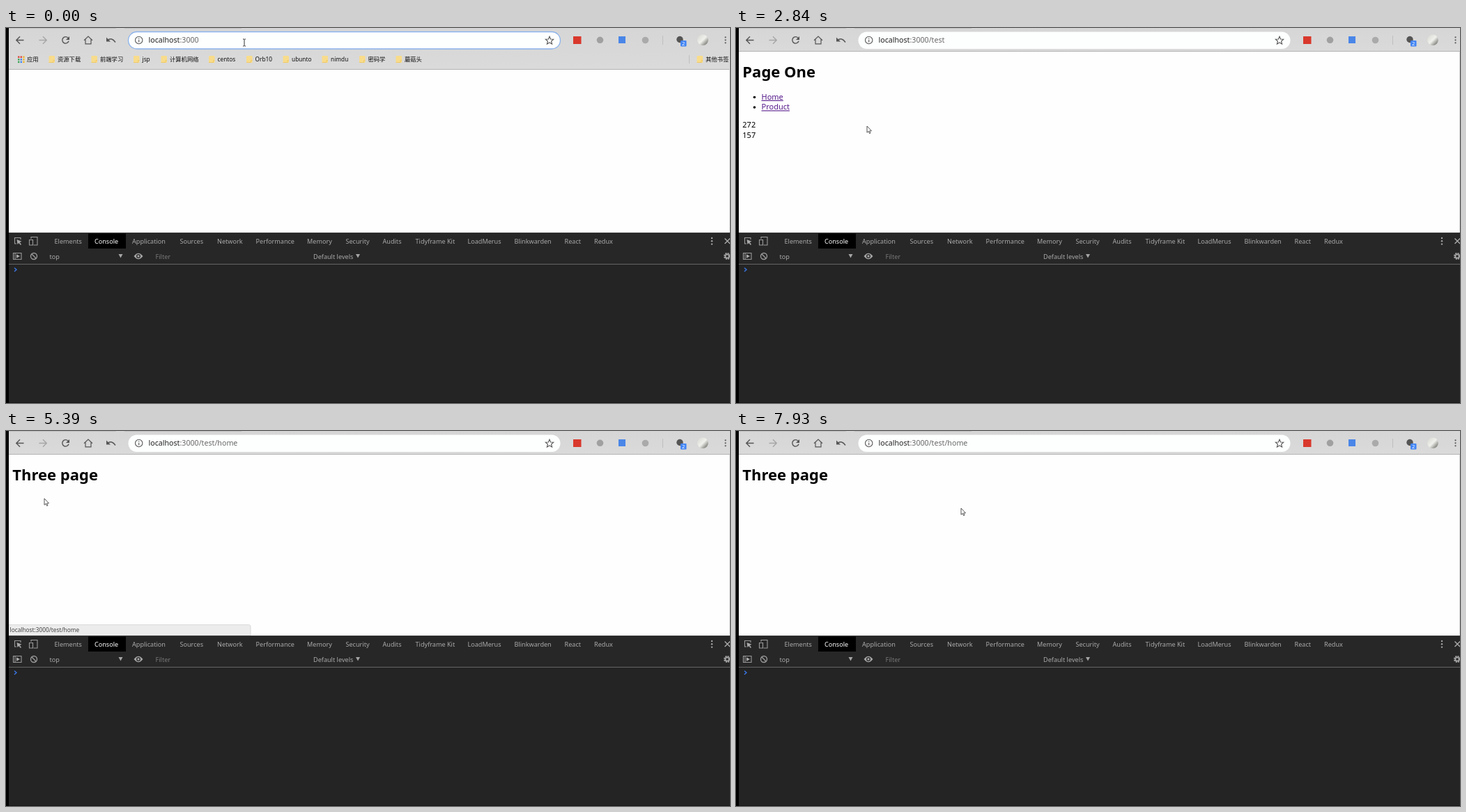
An HTML page that plays this animation: 1039x539 px, repeating every 8 s.

```html
<!DOCTYPE html>
<html lang="zh-CN">
<head>
<meta charset="utf-8">
<title>Page One</title>
<style>
html, body { margin: 0; width: 100%; height: 100%; overflow: hidden; background: #fff; }
svg { display: block; width: 100%; height: 100%; }
text { font-family: "Noto Sans", "Noto Sans CJK SC", "Noto Sans CJK", sans-serif; }
.mark { font-size: 8.3px; font-weight: 500; fill: #111; }
.tool { font-size: 9.1px; fill: #a9a9a9; }
.page { font-size: 11px; fill: #000; }
.page .title { font-size: 22px; font-weight: 700; }
.link { fill: #551a8b; text-decoration: underline; }
.line { fill: none; stroke: #555; stroke-width: 1.4; }
.dim { fill: none; stroke: #9a9a9a; stroke-width: 1.1; }
</style>
</head>
<body>
<svg viewBox="0 0 1039 539">
  <defs>
    <linearGradient id="bar" x1="0" y1="0" x2="0" y2="1">
      <stop offset="0" stop-color="#d6d6d6"/><stop offset="1" stop-color="#dadada"/>
    </linearGradient>
    <linearGradient id="photo" x1="0" y1="0" x2="1" y2="1">
      <stop offset="0" stop-color="#d8d8d2"/><stop offset=".5" stop-color="#f0f0ec"/><stop offset="1" stop-color="#55554f"/>
    </linearGradient>
  </defs>
  <rect width="1039" height="539" fill="#fefefe"/>

  <g id="one" class="page">
    <text class="title" x="9.3" y="71.3">Page One</text>
    <circle cx="26.5" cy="99.5" r="1.8"/><circle cx="26.5" cy="114" r="1.8"/>
    <text class="link" x="36.5" y="102.8">Home</text>
    <text class="link" x="36.5" y="117.4">Product</text>
    <text id="numX" x="9.3" y="143"/>
    <text id="numY" x="9.3" y="157.7"/>
  </g>
  <g id="three" class="page"><text class="title" x="9.3" y="71.3">Three page</text></g>

  <g id="status">
    <path d="M4 278.5H348.500Q351 278.500 351 281V294H4Z" fill="#ececec" stroke="#d4d4d4" stroke-width=".8"/>
    <text id="statusText" x="5.500" y="289" font-size="8.300" fill="#444"/>
  </g>

  <rect id="barBack" width="1039" height="60" fill="url(#bar)"/>
  <path d="M4 .5H158M170 .5H338" stroke="#c2c2c2"/>
  <path id="barEdge" d="M4 0H1039" stroke="#b3b3b3"/>
  <g id="marks">
    <path d="M980.5 39V51" stroke="#bfbfbf"/>
  </g>

  <path class="line" d="M25.500 17.500H15M20 12.300L14.800 17.500L20 22.700"/>
  <path class="line" style="stroke:#a6a6a6" d="M47.500 17.500H58M53 12.300L58.200 17.500L53 22.700"/>
  <g id="reload"><path class="line" d="M89 14.200A4.700 4.700 0 1 0 90 18.800"/><path d="M91 12V17H86Z" fill="#555"/></g>
  <path id="stop" class="line" d="M81 13L90 22M90 13L81 22"/>
  <path class="line" style="stroke-width:1.200" d="M112 17.800L118 12L124 17.800M114 16.500V22.800H122V16.500"/>
  <path class="line" d="M145.500 17.500Q152 13 157 20.500"/><path d="M144 13.500V19.500H150Z" fill="#555"/>

  <rect id="field" x="175.500" y="5.500" width="620" height="24.500" rx="12.250" stroke-width="1.300"/>
  <g id="info" fill="none" stroke="#555" stroke-width="1.100">
    <circle cx="190.700" cy="17.500" r="5.200"/><path d="M190.700 16.700V20.500M190.700 14.300V15.500"/>
  </g>
  <g id="globe" fill="none" stroke="#666" stroke-width="1">
    <circle cx="190.700" cy="17.500" r="5.200"/><ellipse cx="190.700" cy="17.500" rx="2.300" ry="5.200"/><path d="M185.500 17.500H196"/>
  </g>
  <text x="204.500" y="21.300" font-size="10.650"><tspan fill="#222">localhost</tspan><tspan id="path"/></text>
  <path id="star" d="M780 12.200L781.600 16L785.700 16.300L782.600 19L783.600 23L780 20.800L776.400 23L777.400 19L774.300 16.300L778.400 16Z" fill="none" stroke="#555" stroke-width="1.100"/>

  <rect x="814" y="12" width="11.500" height="11" fill="#d9382c"/>
  <circle cx="852.500" cy="17.300" r="4.800" fill="#a0a0a0"/>
  <rect x="879" y="12" width="10" height="10" fill="#4a86e8"/>
  <circle cx="917.500" cy="17.500" r="4.800" fill="#aaa"/>
  <path d="M942.500 11V24" stroke="#bebebe"/>
  <circle cx="967" cy="16.500" r="4.700" fill="#555"/>
  <rect x="968" y="18" width="8.500" height="8.500" rx="1" fill="#4285f4"/>
  <text x="972.200" y="25" font-size="7.500" fill="#fff" text-anchor="middle">2</text>
  <circle cx="1000" cy="17.300" r="7.800" fill="url(#photo)"/>
  <g fill="#555"><circle cx="1032.500" cy="13.300" r="1.100"/><circle cx="1032.500" cy="17.300" r="1.100"/><circle cx="1032.500" cy="21.300" r="1.100"/></g>

  <g id="tools">
    <rect y="294" width="1039" height="245" fill="#242424"/>
    <rect y="294" width="1039" height="45" fill="#272727"/>
    <path d="M4 294.500H1039" stroke="#3a3a3a"/>
    <path d="M4 339.500H1039" stroke="#656565"/>
    <path d="M4 538.500H1039" stroke="#151515"/>
    <rect x="118" y="295.500" width="54" height="21.500" fill="#000"/>
    <path class="dim" d="M15 310H12.500V301.500H21V304"/><path d="M15.500 304L22.500 306.800L19.700 308L22 311L20.800 312L18.500 309L16.500 311Z" fill="#aaa"/>
    <path class="dim" d="M36 303V300.500H45V312H39.500M33.500 304.500H38.500V312H33.500Z"/>
    <path class="dim" d="M10.500 323.500H22V332.500H10.500ZM13 323.500V332.500"/><path d="M15 325.300L20 328L15 330.700Z" fill="#aaa"/>
    <g class="dim" style="stroke-width:1.400"><circle cx="40" cy="328" r="4.500"/><path d="M36.800 324.800L43.200 331.200"/></g>
    <path d="M161.500 325H167.500L164.500 330.500ZM502 325H508L505 330.500Z" fill="#a5a5a5"/>
    <path d="M183.500 328Q190 319.500 196.500 328Q190 336.500 183.500 328Z" fill="#a5a5a5"/>
    <circle cx="190" cy="328" r="2.300" fill="none" stroke="#272727" stroke-width="1.300"/>
    <g fill="#a5a5a5"><circle cx="1013" cy="302" r="1.200"/><circle cx="1013" cy="306.300" r="1.200"/><circle cx="1013" cy="310.600" r="1.200"/></g>
    <path d="M1031.500 302.500L1039 310M1039 302.500L1031.500 310" stroke="#aaa" stroke-width="1.400"/>
    <circle cx="1035" cy="328" r="4.200" fill="none" stroke="#a5a5a5" stroke-width="1.800" stroke-dasharray="2.100 1.200"/>
    <circle cx="1035" cy="328" r="2.700" fill="none" stroke="#a5a5a5" stroke-width="1.800"/>
    <path d="M12 344.700L15 347.300L12 350" fill="none" stroke="#3b78e7" stroke-width="1.400"/>
  </g>

  <path d="M1038.500 34V294" stroke="#d5d5d5"/>
  <rect width="4" height="539" fill="#000"/>

  <g id="arrow"><path d="M0 0V9.300L2.100 7.400L3.600 10.600L5 10L3.600 6.900H6.500Z" fill="#fff" stroke="#444" stroke-width=".9"/></g>
  <g id="hand"><path d="M-1 0Q0 -1 1 0V4L4.500 5Q5.500 5.500 5.200 7L4 12H-1.500L-4 7.500Q-3.500 6 -1 8Z" fill="#fff" stroke="#444" stroke-width=".9"/></g>
  <g id="beam"><path d="M-2 -5H-.6L0 -4.400L.6 -5H2M0 -4.400V4.400M-2 5H-.6L0 4.400L.6 5H2" fill="none" stroke="#333" stroke-width="1"/></g>
</svg>
<script>
const LOOP = 8000;
const $ = id => document.getElementById(id);
const show = (id, on) => $(id).setAttribute('display', on ? 'inline' : 'none');
const set = (id, attrs) => Object.entries(attrs).forEach(([k, v]) => $(id).setAttribute(k, v));

function add(parent, tag, attrs, text = '') {
  const el = document.createElementNS('http://www.w3.org/2000/svg', tag);
  Object.entries(attrs).forEach(([k, v]) => el.setAttribute(k, v));
  el.textContent = text;
  $(parent).appendChild(el);
}

function buildBookmarks() {
  const names = [['资源下载', 74], ['前端学习', 135], ['jsp', 195.5], ['计算机网络', 235], ['centos', 303.5],
    ['Orb10', 357.5], ['ubunto', 410], ['nimdu', 466], ['密码学', 519.5], ['蘑菇头', 572], ['其他书签', 1004]];
  const dots = ['#e0453a', '#e0453a', '#f0b429', '#3aa757', '#4285f4', '#f0b429', '#3aa757', '#4285f4', '#f0b429'];
  dots.forEach((fill, i) => add('marks', 'rect',
    { x: 17 + i % 3 * 3.6, y: 40.5 + Math.floor(i / 3) * 3.6, width: 2.4, height: 2.4, fill }));
  add('marks', 'text', { x: 30, y: 48.3, class: 'mark' }, '应用');
  for (const [name, x] of names) {
    add('marks', 'rect', { x: x - 12.5, y: 40, width: 8.5, height: 10, rx: 1, fill: '#f8dc8b' });
    add('marks', 'path', { d: `M${x - 12.5} 49.5h6.500v-3h2`, fill: 'none', stroke: '#edc45f', 'stroke-width': .8 });
    add('marks', 'text', { x, y: 48.3, class: 'mark' }, name);
  }
}

function buildTools() {
  const tabs = [['Elements', 69.5], ['Console', 127], ['Application', 181], ['Sources', 249.5], ['Network', 303],
    ['Performance', 358.5], ['Memory', 432], ['Security', 487.5], ['Audits', 540.5], ['Tidyframe Kit', 587.5],
    ['LoadMerus', 662.5], ['Blinkwarden', 729.5], ['React', 801.5], ['Redux', 844]];
  for (const [name, x] of tabs)
    add('tools', 'text', { x, y: 309.7, class: 'tool', style: name === 'Console' ? 'fill:#fff' : '' }, name);
  add('tools', 'text', { x: 62.5, y: 331.5, class: 'tool' }, 'top');
  add('tools', 'text', { x: 214.5, y: 332, class: 'tool', style: 'fill:#777' }, 'Filter');
  add('tools', 'text', { x: 441, y: 331.5, class: 'tool' }, 'Default levels');
}

// The screen was refreshed at these moments only.
const ticks = [0, 270, 550, 680, 1240, 1520, 1660, 2070, 2190, 2310, 2440, 2570, 2700, 2840, 2960, 3080,
  3200, 3340, 3480, 3620, 3760, 3900, 4040, 4170, 4290, 4440, 4570, 4700, 4830, 4960,
  5240, 5390, 5640, 5790, 6220, 6360, 6500, 6640, 6780, 6920, 7050, 7350, 7500, 7640, 7790, 7930];

// Pointer path: time, x, y.
const route = [[0, 342, 21], [1660, 349, 91], [2190, 349, 91], [2700, 188, 141], [2840, 188, 141], [3080, 192, 145],
  [3480, 271, 163], [4040, 110, 122], [4290, 73, 108], [4440, 65, 102], [4960, 55, 97], [5790, 55, 97],
  [6220, 66, 95], [7050, 299, 42], [7350, 308, 24], [7500, 315, 17], [7790, 319, 20], [7930, 323, 111]];

function pointer(t) {
  const i = route.findIndex(p => p[0] > t);
  if (i < 0) return route[route.length - 1].slice(1);
  const [t0, x0, y0] = route[i - 1], [t1, x1, y1] = route[i];
  const k = (t - t0) / (t1 - t0);
  return [x0 + (x1 - x0) * k, y0 + (y1 - y0) * k];
}

function urlPath(t) {
  if (t < 270) return ':3000';
  if (t < 550) return ':3000/';
  if (t < 680) return ':3000/te';
  return t < 5240 ? ':3000/test' : ':3000/test/home';
}

function render(time) {
  let i = ticks.length - 1;
  while (ticks[i] > time) i--;
  const t = ticks[i];
  const between = (a, b) => t >= a && t < b;
  const typing = between(270, 1240), loading = between(1240, 1660), loaded = t >= 2440;
  const over = between(7350, 7930);

  const bar = loaded ? 34 : 60;
  set('barBack', { height: bar });
  set('barEdge', { transform: `translate(0 ${bar - .5})` });
  show('marks', !loaded);
  show('reload', !loading);
  show('stop', loading);
  show('info', !typing);
  show('star', !typing);
  show('globe', typing);
  set('field', { fill: over ? '#f7f7f7' : '#fdfefe', stroke: t < 1240 ? '#8ab2ec' : 'none' });
  $('path').textContent = urlPath(t);
  set('path', { fill: typing ? '#222' : '#696969' });

  show('one', between(2440, 5240));
  show('three', t >= 5240);
  // The counters trail the pointer by one refresh.
  const [px, py] = pointer(ticks[Math.max(0, i - 1)]);
  $('numX').textContent = Math.round((px - 4) * 1.478);
  $('numY').textContent = Math.round((py - 34) * 1.47);

  show('status', between(1520, 2440) || between(4570, 5790));
  $('statusText').textContent = t < 2440 ? '正在连接...' : 'localhost:3000/test/home';

  const [x, y] = pointer(t);
  const shape = t < 270 || over ? 'beam' : between(270, 1660) ? '' : between(4290, 5240) ? 'hand' : 'arrow';
  for (const id of ['arrow', 'hand', 'beam']) {
    show(id, id === shape);
    set(id, { transform: `translate(${x} ${y})` });
  }
}

buildBookmarks();
buildTools();
const start = performance.now();
function frame() {
  render((performance.now() - start) % LOOP);
  requestAnimationFrame(frame);
}
frame();
</script>
</body>
</html>
```
